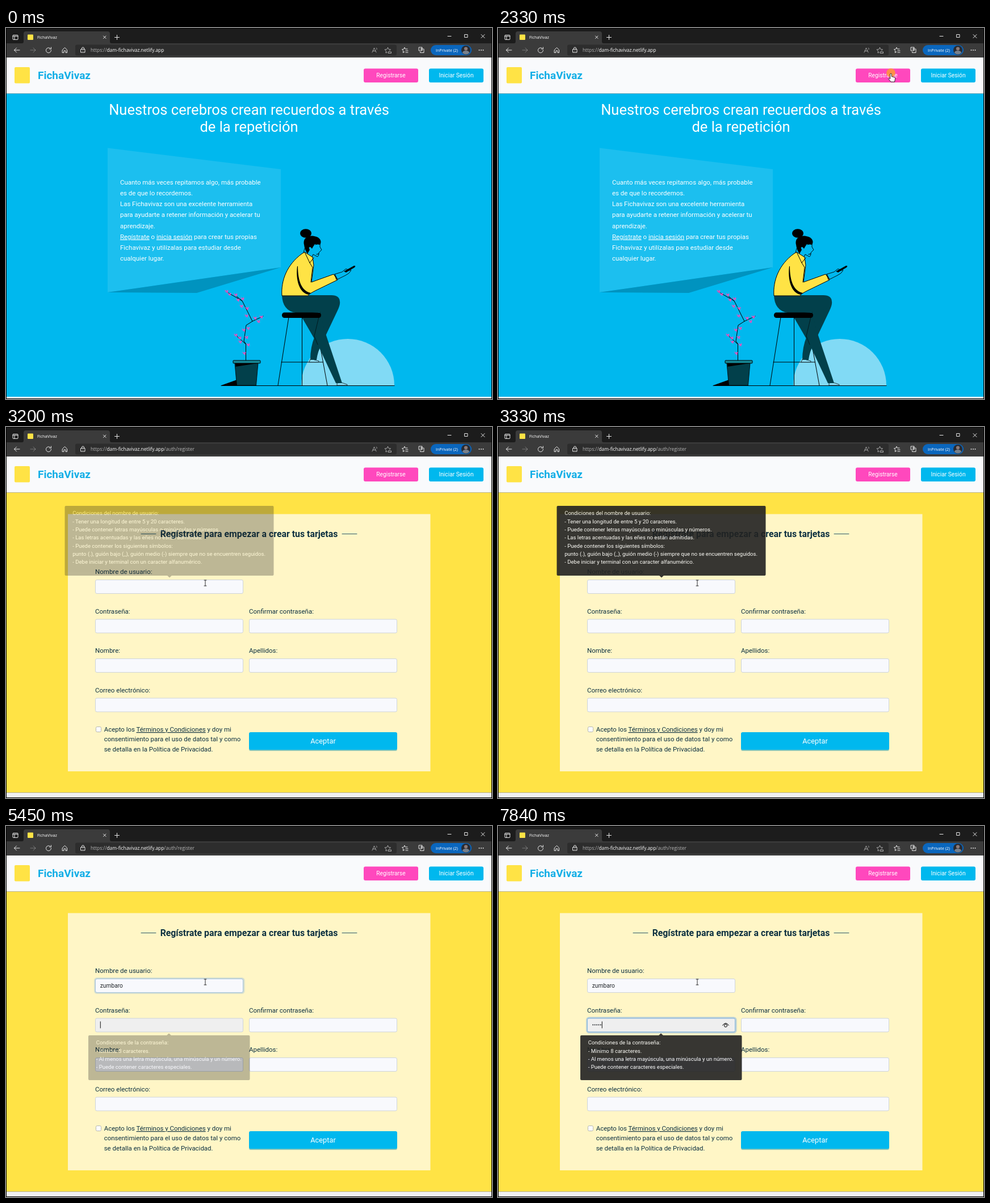
An HTML page for the animation above (8 s loop, 856 px wide and 654 px high).

```html
<!DOCTYPE html>
<html lang="es">
<head>
<meta charset="utf-8">
<title>FichaVivaz</title>
<style>
  html, body { margin: 0; width: 100%; height: 100%; overflow: hidden; background: #000; }
  svg { display: block; width: 856px; height: 654px; }
  text { font: 11.52px Roboto, sans-serif; fill: #0c3040; white-space: pre; }
  .ui { font: 7.3px "Open Sans", "Noto Sans", sans-serif; fill: #fff; }
  .url { font-size: 8.35px; }
  .white text { fill: #fff; }
  .mid { text-anchor: middle; }
  .tip text { font-size: 9.55px; fill: #fff; }
  .line { fill: none; stroke: #e8e8e8; stroke-width: 1; stroke-linecap: round; stroke-linejoin: round; }
  .ink { fill: none; stroke: #000; stroke-width: 1; stroke-linecap: round; stroke-linejoin: round; }
  .typed { font-size: 10.24px; fill: #212529; }
</style>
</head>
<body>
<svg id="stage" viewBox="0 0 856 654"></svg>
<script>
const CYAN = '#00b8ee', YELLOW = '#ffe345', PINK = '#ff48bd', TEAL = '#02404b';

const rect = (x, y, w, h, fill, rx = 0, extra = '') =>
  `<rect x="${x}" y="${y}" width="${w}" height="${h}" fill="${fill}" rx="${rx}" ${extra}/>`;
const text = (x, y, s, extra = '') => `<text x="${x}" y="${y}" ${extra}>${s}</text>`;
const lines = (x, y, step, rows, extra = '') => rows.map((s, i) => text(x, y + i * step, s, extra)).join('');
const shape = (d, fill, extra = '') => `<path d="${d}" fill="${fill}" ${extra}/>`;
const stroke = (d, cls = 'line', extra = '') => `<path d="${d}" class="${cls}" ${extra}/>`;
const underline = s => `<tspan text-decoration="underline">${s}</tspan>`;

const chrome = rect(1, 1, 854, 27, '#1c1c1c') + rect(1, 27, 854, 25, '#3b3b3b') +
  shape('M28 27Q31 27 31 24V10Q31 6 35 6H179Q183 6 183 10V24Q183 27 186 27Z', '#3b3b3b') +
  rect(38, 11.5, 10, 9.5, YELLOW, 1) +
  text(55, 19, 'FichaVivaz', 'class="ui"') +
  stroke('M171.5 14L176 18.5M176 14L171.5 18.5M191.5 16.5H199.5M195.5 12.5V20.5') +
  stroke('M13 12.5H20Q21 12.5 21 13.5V19.5Q21 20.5 20 20.5H13Q12 20.5 12 19.5V13.5Q12 12.5 13 12.5M12 14.5H21M15 14.5V20') +
  stroke('M778 14.5H784M808 11.5H813V16.5H808ZM837 11.5L843 17.5M843 11.5L837 17.5') +
  stroke('M14.5 39H24M18.5 35L14.5 39L18.5 43') +
  stroke('M43 39H52M48 35L52 39L48 43', 'line', 'opacity=".35"') +
  stroke('M79.5 39A4.5 4.5 0 1 1 77.5 35.5M79.5 34V37H76.5') +
  stroke('M99.5 38.5L103.5 34.5L107.5 38.5V43.5H105V40H102V43.5H99.5Z') +
  rect(122, 29.5, 566, 19, '#2d2d2d', 3) +
  stroke('M132 37.5H139V43H132ZM133.5 37.5V36A2 2 0 0 1 137.5 36V37.5M135.5 40V40.2') +
  '<text x="149" y="42" class="ui url" fill-opacity=".65">https://<tspan fill-opacity="1">dam-fichavivaz.netlify.app</tspan><tspan id="path">/auth/register</tspan></text>' +
  stroke('M645 43L648.5 35L652 43M646.3 40.5H650.7M652.5 35Q654 36 653 38', 'line', 'opacity=".6"') +
  stroke('M672.5 34.5L674 37.5L677.5 38L675 40.5M671 43L669 44L669.5 40.5L667 38L671 37.5L672.5 34.5M673.5 42H678.5V44.5H673.5Z', 'line', 'opacity=".65"') +
  stroke('M702 34.5L703.3 37H707M702 34.5L700.6 37.2L697.5 37.8L699.8 40L699.3 43.5L702 42M704 40H708M704 43H708') +
  stroke('M727.5 34H733V40H727.5ZM729.5 42V43.5H736V37H735M730 37H734M732 35V39') +
  rect(748, 30, 72, 18, '#0a66bd', 9) + text(757, 41.7, 'InPrivate (2)', 'class="ui" font-weight="600" style="font-size:7px"') +
  '<circle cx="810" cy="39" r="8" fill="#292b32"/><circle cx="810" cy="36.5" r="3.1" fill="#8d7b78"/>' +
  shape('M804 44Q804 40 810 40T816 44Q810 49 804 44Z', '#77818d') +
  '<g fill="#eee"><circle cx="833.5" cy="39" r=".9"/><circle cx="837" cy="39" r=".9"/><circle cx="840.5" cy="39" r=".9"/></g>';

const header = rect(1, 52, 854, 63.5, '#f9fafc') + rect(15, 69, 27, 28.5, YELLOW, 2) +
  text(56, 90, 'FichaVivaz', `style="font-size:19px;font-weight:700;fill:#12aee6"`) +
  rect(630, 71.5, 96, 24.5, PINK, 3) + rect(745, 71.5, 96, 24.5, CYAN, 3) +
  '<g class="white mid">' + text(678, 87, 'Registrarse', 'style="font-size:10.24px"') +
  text(793, 87, 'Iniciar Sesión', 'style="font-size:10.24px"') + '</g>';

const blossoms = [[388, 464], [393, 469], [404, 470], [408, 479], [416, 477], [414, 490], [424, 494], [423, 507],
  [438, 511], [449, 509], [444, 517], [426, 529], [418, 532], [404, 541], [411, 546], [423, 545], [412, 553], [426, 558], [419, 573]]
  .map(([x, y]) => shape(`M${x - 3} ${y - 2}h2l1 2l2 -2l2 1l-2 2l1 2h-2l-1 -2l-2 1l1 -2z`, PINK)).join('');

const plant = stroke('M422.5 586V557L419 552L423 524L434 517L416 481L388 465M434 517L453 508M422 557L404 541M416 481L406 473') +
  '';
const plantArt = plant.replace('class="line"', 'class="ink"') + blossoms +
  shape('M379 630L407 620V630Z', '#000') + shape('M403 591H444L440.5 630H406.5Z', TEAL, 'stroke="#000" stroke-width=".8"') +
  shape('M404 591H443L404.5 597Z', '#000') + rect(400, 586, 48, 5, '#168a98', 1, 'stroke="#000"');

const woman =
  stroke('M498 510L479 630M521.5 510V630M544 510L566 630M485 589H558', 'ink') +
  shape('M536 584Q541 583 543 585L551 587Q552 589 549 589H534Z', '#8bdcf4', 'stroke="#000" stroke-width=".7"') +
  shape('M583 626Q590 624 594 626L601 628.5V630H583Z', '#8bdcf4', 'stroke="#000" stroke-width=".7"') +
  shape('M553 500L588 482Q589 488 584 498L556 557Q549 570 547 585H536Q536 562 544 543Z', TEAL) +
  shape('M520 508L555 508Q558 522 563 539L592 626H581L549 558Z', TEAL) +
  shape('M486 471H573Q588 471 588 483Q586 496 564 499Q552 503 510 502Q487 498 486 471Z', TEAL) +
  stroke('M553 501L543 543L549 558', 'ink', 'stroke-width=".6" opacity=".6"') +
  rect(486, 501.5, 69, 9.5, '#000', 4.5) +
  shape('M526 389L523 399L538 406L541 399L548 403Q551 403 551 396L556 391L553 386V379H530Z', CYAN, 'stroke="#000" stroke-width=".9"') +
  shape('M525 382C522 367 537 364 547 368C555 371 556 378 553 382L544 381Q541 385 539 389L536 386Q532 386 535 391L531 398Q526 391 525 382Z', '#000') +
  '<ellipse cx="528" cy="362" rx="10" ry="7.7" fill="#000"/>' + stroke('M545 382L550 380M547 399L551 398', 'ink') +
  shape('M521 398L526 395L540 404L542 418L538 448L577 434L584 444L545 463Q533 469 532 472H486C484 445 495 417 521 398Z', YELLOW, 'stroke="#000" stroke-width="1"') +
  shape('M513 420C510 443 516 467 533 470L537 467C521 464 514 446 514 420Z', '#000') +
  stroke('M526 395L535 414L542 405M535 414L540 422L537 448M579 434L582 444', 'ink') +
  shape('M579 434L592 430L598 425Q602 424 601 427L608 427Q605 433 598 436L584 443Z', CYAN, 'stroke="#000" stroke-width=".9"') +
  shape('M595 429L613 419Q617 419 614 422L599 431Z', '#000');

const home = rect(1, 115.5, 854, 534.5, CYAN) + rect(1, 650, 854, 3, '#f4f6f8') +
  '<g class="white">' + lines(428, 152.5, 30.7, ['Nuestros cerebros crean recuerdos a través', 'de la repetición'], 'class="mid" style="font-size:25.5px"') +
  shape('M179 211.5L484 249V422L179 466Z', '#1cbfef') + shape('M179 466L484 422L336 467Z', '#0093bf') +
  lines(201, 276, 19.15, ['Cuanto más veces repitamos algo, más probable', 'es de que lo recordemos.',
    'Las Fichavivaz son una excelente herramienta', 'para ayudarte a retener información y acelerar tu', 'aprendizaje.',
    `${underline('Regístrate')} o ${underline('inicia sesión')} para crear tus propias`,
    'Fichavivaz y utilízalas para estudiar desde', 'cualquier lugar.'], 'style="font-size:11.45px"') + '</g>' +
  shape('M520 630A82 82 0 0 1 684 630Z', '#81daf5') + plantArt + woman + stroke('M379 630.5H684', 'ink');

const field = (x, y, w, label, id = '') => text(x, y - 10, label) +
  rect(x + .5, y + .5, w, 24, '#f8f9fd', 2.5, `stroke="#ced4da" ${id && `id="${id}"`}`);
const ring = (y, id) => `<g id="${id}">` + rect(156.3, y - .7, 263, 26.4, 'none', 4, 'stroke="#0d6efd" stroke-opacity=".27" stroke-width="2.6"') +
  rect(157.5, y + .5, 260, 24, 'none', 2.5, 'stroke="#86b7e0"') + '</g>';
const tooltip = (id, x, y, w, h, arrow, rows) => `<g id="${id}" class="tip">` +
  shape(arrow, '#222') + rect(x, y, w, h, '#222', 2) + lines(x + 13.7, y + 16.2, 14.35, rows) + '</g>';

const register = rect(1, 115.5, 854, 529, YELLOW) + rect(1, 644.5, 854, 8.5, '#f1f1f2') + rect(109, 153.5, 638.5, 453.5, '#fff6c6') +
  text(428, 194, 'Regístrate para empezar a crear tus tarjetas', 'class="mid" style="font-size:15.85px;font-weight:700"') +
  stroke('M238 188.5H264M592 188.5H618', 'line', 'style="stroke:#275a68"') +
  field(157, 269, 260, 'Nombre de usuario:', 'userField') +
  field(157, 338.5, 260, 'Contraseña:', 'passField') + field(428, 338.5, 260, 'Confirmar contraseña:') +
  field(157, 408, 260, 'Nombre:') + field(428, 408, 260, 'Apellidos:') + field(157, 477.5, 531, 'Correo electrónico:') +
  ring(269, 'userRing') + ring(338.5, 'passRing') +
  rect(158.5, 528.5, 9, 9, '#fff', 2, 'stroke="#b4b5b0"') +
  lines(172.7, 537, 17.25, [`Acepto los ${underline('Términos y Condiciones')} y doy mi`,
    'consentimiento para el uso de datos tal y como', 'se detalla en la Política de Privacidad.'], 'style="font-size:11.46px"') +
  rect(428, 540, 261, 31, '#1597b0', 3, 'opacity=".5"') + rect(428, 538, 261, 31, CYAN, 3) +
  '<g class="white">' + text(558.5, 557.7, 'Aceptar', 'class="mid" style="font-size:12.8px"') + '</g>' +
  text(165.7, 285, '', 'id="user" class="typed"') + '<g id="dots" fill="#212529"></g>' +
  `<g id="eye">${stroke('M395.5 351.5Q401 343.5 406.5 351.5', 'ink')}<circle cx="401" cy="351.8" r="2.6" class="ink"/></g>` +
  rect(0, 0, 1, 12, '#111', 0, 'id="caret"') +
  tooltip('userTip', 103.5, 139, 368, 123, 'M283 261H293L288 265.5Z', ['Condiciones del nombre de usuario:',
    '- Tener una longitud de entre 5 y 20 caracteres.', '- Puede contener letras mayúsculas o minúsculas y números.',
    '- Las letras acentuadas y las eñes no están admitidas.', '- Puede contener los siguientes símbolos:',
    'punto (.), guión bajo (_), guión medio (-) siempre que no se encuentren seguidos.', '- Debe iniciar y terminal con un caracter alfanumérico.']) +
  tooltip('passTip', 145, 369, 284.5, 79, 'M282 370H292L287 365.5Z', ['Condiciones de la contraseña:', '- Mínimo 8 caracteres.',
    '- Al menos una letra mayúscula, una minúscula y un número.', '- Puede contener caracteres especiales.']);

const pointer = `<g id="pointer"><circle id="click" r="7.8" cy="-1" fill="#ff9a35" opacity=".85"/>
  <path id="arrow" d="M0 0V11L2.6 8.6L4.3 12.2L6 11.4L4.3 8H8Z" fill="#fff" stroke="#000" stroke-width=".7"/>
  <path id="hand" d="M-1.3 1Q0 -.8 1.3 1V5.5L6.5 7Q8 7.5 7.6 9.5L6.5 15H0L-4.3 9.5Q-4 7.6 -1.3 9.5Z" fill="#fff" stroke="#000" stroke-width=".8"/>
  <path id="beam" d="M-2 -5H2M0 -5V5M-2 5H2" class="ink" style="stroke:#333"/></g>`;

document.getElementById('stage').innerHTML =
  `<g id="home">${home}</g><g id="register">${register}</g>${header}${chrome}${pointer}`;

const el = id => document.getElementById(id);
const show = (id, on) => el(id).setAttribute('display', on ? 'inline' : 'none');
const fade = (id, amount) => el(id).setAttribute('opacity', amount);
const ramp = (t, a, b) => Math.min(1, Math.max(0, (t - a) / (b - a)));
const count = (times, t) => times.filter(k => t >= k).length;

const USER = 'zumbaro', DOT = 3.4;
const userKeys = [4460, 4590, 4730, 4790, 4920, 5120, 5190];
const passKeys = [6180, 7180, 7310, 7710, 7840];
const moves = [[190, 400, 617, 372], [860, 1500, 692, 80], [2720, 3130, 351, 275]];
const NAV = 2460, CLICK = 3380, TAB = 5450, BLINK = 530;

function pointerAt(t) {
  let x = 860, y = 560;
  for (const [start, end, toX, toY] of moves) {
    const p = ramp(t, start, end), e = p * p * (3 - 2 * p);
    x += (toX - x) * e;
    y += (toY - y) * e;
  }
  return [x, y];
}

function draw(t) {
  const onForm = t >= NAV, onPass = t >= TAB;
  show('home', !onForm);
  show('register', onForm);
  show('path', onForm);

  const [x, y] = pointerAt(t);
  const overButton = x > 630 && x < 726 && y > 71 && y < 96;
  const overField = onForm && x < 418 && y > 269;
  el('pointer').setAttribute('transform', `translate(${x} ${y})`);
  show('pointer', t >= 190);
  show('click', t >= 2330 && t < NAV);
  show('hand', overButton);
  show('beam', overField);
  show('arrow', !overButton && !overField);

  fade('userTip', onPass ? 0 : .9 * ramp(t, 3152, 3302));
  fade('passTip', onPass ? .9 * ramp(t, TAB - 48, TAB + 102) : 0);
  fade('userRing', ramp(t, CLICK, CLICK + 90) * (1 - ramp(t, TAB - 60, TAB + 90)));
  fade('passRing', ramp(t, TAB, TAB + 150));
  el('userField').setAttribute('fill', t >= CLICK && !onPass ? '#efefef' : '#f8f9fd');
  el('passField').setAttribute('fill', onPass ? '#efefef' : '#f8f9fd');

  const letters = count(userKeys, t), dots = count(passKeys, t);
  el('user').textContent = USER.slice(0, letters);
  el('dots').innerHTML = Array.from({ length: dots }, (_, i) =>
    `<circle cx="${167.3 + i * DOT}" cy="350.5" r="1.05"/>`).join('');
  show('eye', dots > 0);

  const lastReset = [3340, TAB, ...userKeys, ...passKeys].filter(k => k <= t).reduce((a, b) => Math.max(a, b), 0);
  const caretX = onPass ? 165.8 + dots * DOT : 166 + (letters ? el('user').getComputedTextLength() : 0);
  el('caret').setAttribute('x', caretX);
  el('caret').setAttribute('y', onPass ? 344.5 : 275);
  show('caret', t >= CLICK && Math.floor((t - lastReset) / BLINK) % 2 === 0);
}

function frame() {
  draw(performance.now() % 8000);
  requestAnimationFrame(frame);
}
frame();
</script>
</body>
</html>
```
